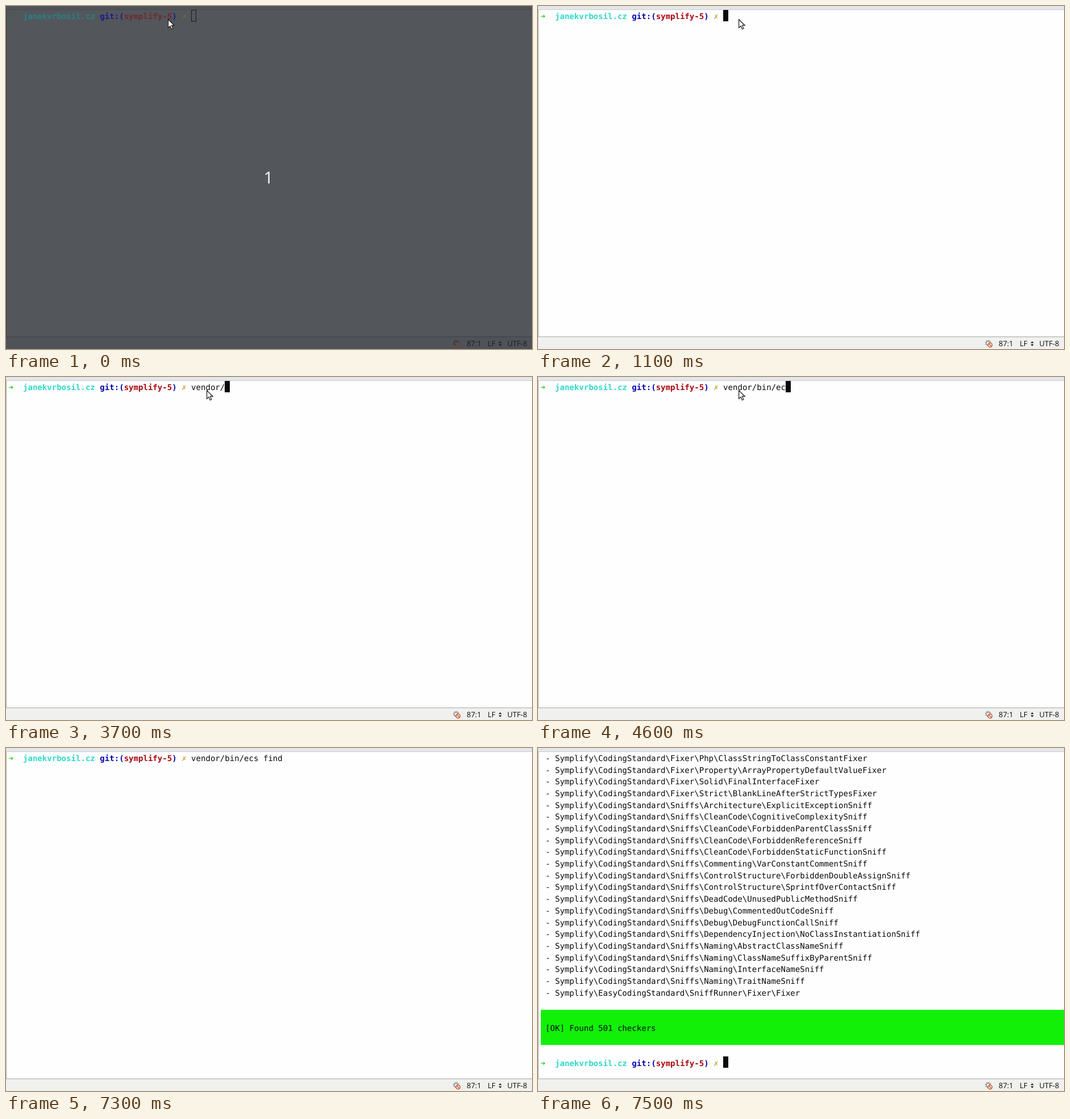
Recreate the animation shown at these times as an HTML page. Size 926 by 605 pixels, loop 8 s.

```html
<!DOCTYPE html>
<html lang="en">
<head>
<meta charset="utf-8">
<title>Terminal</title>
<style>
  :root {
    --bg: #fefefe; --strip: #f0f0ef; --bar: #f0f0ef; --edge: #a6a6a6; --top: #cbcbcb;
    --ink: #0a0a0a; --arrow: #2ad01c; --dir: #2fd9c8; --git: #0808a8; --branch: #a80810; --cross: #cf9f33;
    --gear: #8f8f8f; --stop: #d2592f;
  }
  .active { --strip: #e3e7ea; }
  .dim {
    --bg: #53565b; --strip: #505358; --bar: #4f5256; --edge: #3c3f43; --top: #484b4f;
    --ink: #191b1e; --arrow: #2c6f3c; --dir: #288188; --git: #1b1d86; --branch: #6f2a2c; --cross: #75633c;
    --gear: #36393c; --stop: #6a4a3c;
  }
  html, body { margin: 0; width: 100%; height: 100%; overflow: hidden; }
  svg { display: block; width: 926px; height: 605px; background: var(--bg); }
  text { white-space: pre; text-rendering: geometricPrecision; fill: var(--ink); }
  .term text { font: 14.05px "DejaVu Sans Mono", "DejaVu Sans", monospace; }
  .term .b { font-weight: bold; }
  .status text { font: 13px "Open Sans", sans-serif; }
  #count { font: 29px "Open Sans", sans-serif; fill: #fff; text-anchor: middle; }
</style>
</head>
<body>
<svg id="stage" viewBox="0 0 926 605">
  <rect width="926" height="6" fill="var(--strip)"/>
  <rect y="6" width="926" height="1" fill="var(--top)"/>
  <rect y="6" width="1" height="577" fill="var(--edge)"/>

  <g class="term">
    <g id="list"></g>
    <g id="footer">
      <rect x="5" y="461.8" width="921" height="62" fill="#12f008"/>
    </g>
    <g id="prompt"></g>
    <text id="typed"></text>
    <rect id="caret" stroke="var(--ink)"/>
  </g>

  <g class="status">
    <rect y="583" width="926" height="22" fill="var(--bar)"/>
    <rect y="583" width="926" height="1" fill="var(--edge)"/>
    <g fill="none">
      <circle cx="792.4" cy="594.4" r="3.2" stroke="var(--gear)" stroke-width="1.4"/>
      <circle cx="792.4" cy="594.4" r="4.7" stroke="var(--gear)" stroke-width="1.5" stroke-dasharray="1.8 1.89"/>
      <circle cx="795.9" cy="598.1" r="3.6" fill="var(--bar)" stroke="var(--stop)" stroke-width="1.5"/>
      <path d="M793.4 595.6l5 5" stroke="var(--stop)" stroke-width="1.4"/>
    </g>
    <text x="811" y="600">87:1</text>
    <text x="848" y="600">LF</text>
    <path d="M867.3 594.6l2.7-3 2.7 3zM867.3 596.8l2.7 3 2.7-3z" fill="var(--ink)"/>
    <text x="882.5" y="600">UTF-8</text>
  </g>

  <text id="count" x="462" y="313">1</text>
  <path id="mouse" d="M.6.8V15.4L4 12.2 6.4 17.8 8.9 16.7 6.5 11.2H11.2Z" fill="#fff" stroke="#1a1a1a" stroke-width="1.2"/>
</svg>

<script>
const LOOP = 8000, COL = 8.46, ROW = 20.68, LEFT = 4.6, TOP = 6.7;
const OFF = 0, SOLID = 1, HOLLOW = 2;
const $ = id => document.getElementById(id);
const colX = c => LEFT + c * COL;
const baseline = r => TOP + 16.3 + r * ROW;

function addText(parent, str, col, row, fill) {
  const el = document.createElementNS("http://www.w3.org/2000/svg", "text");
  el.textContent = str;
  el.setAttribute("x", colX(col));
  el.setAttribute("y", baseline(row));
  if (fill) {
    el.setAttribute("class", "b");
    el.style.fill = `var(--${fill})`;
  }
  parent.append(el);
}

const groups = [
  ["Fixer\\Php", "ClassStringToClassConstantFixer"],
  ["Fixer\\Property", "ArrayPropertyDefaultValueFixer"],
  ["Fixer\\Solid", "FinalInterfaceFixer"],
  ["Fixer\\Strict", "BlankLineAfterStrictTypesFixer"],
  ["Sniffs\\Architecture", "ExplicitExceptionSniff"],
  ["Sniffs\\CleanCode", "CognitiveComplexitySniff", "ForbiddenParentClassSniff",
    "ForbiddenReferenceSniff", "ForbiddenStaticFunctionSniff"],
  ["Sniffs\\Commenting", "VarConstantCommentSniff"],
  ["Sniffs\\ControlStructure", "ForbiddenDoubleAssignSniff", "SprintfOverContactSniff"],
  ["Sniffs\\DeadCode", "UnusedPublicMethodSniff"],
  ["Sniffs\\Debug", "CommentedOutCodeSniff", "DebugFunctionCallSniff"],
  ["Sniffs\\DependencyInjection", "NoClassInstantiationSniff"],
  ["Sniffs\\Naming", "AbstractClassNameSniff", "ClassNameSuffixByParentSniff",
    "InterfaceNameSniff", "TraitNameSniff"],
];
const checkers = groups.flatMap(([ns, ...names]) =>
  names.map(name => `Symplify\\CodingStandard\\${ns}\\${name}`));
checkers.push("Symplify\\EasyCodingStandard\\SniffRunner\\Fixer\\Fixer");
checkers.forEach((name, row) => addText($("list"), "- " + name, 1, row));
addText($("footer"), "[OK] Found 501 checkers", 1, 23);

[["➜", 0, "arrow"], ["janekvrbosil.cz", 3, "dir"], ["git:(", 19, "git"],
 ["symplify-5", 24, "branch"], [")", 34, "git"], ["✗", 36, "cross"]]
  .forEach(([str, col, fill]) => addText($("prompt"), str, col, 0, fill));
$("typed").setAttribute("x", colX(38));
$("typed").setAttribute("y", baseline(0));

// time, typed length, caret
const keys = [
  [0, 0, HOLLOW], [1100, 0, SOLID], [2100, 0, OFF], [2800, 0, SOLID],
  [3100, 1, SOLID], [3200, 2, SOLID], [3300, 3, SOLID], [3400, 5, SOLID], [3500, 6, SOLID],
  [3700, 7, SOLID], [3900, 8, SOLID], [4000, 9, SOLID], [4200, 11, SOLID],
  [4400, 12, SOLID], [4600, 13, SOLID], [4900, 15, SOLID], [5400, 15, OFF], [5900, 15, SOLID],
  [6000, 14, SOLID], [6100, 16, SOLID], [6300, 18, SOLID], [6400, 19, SOLID],
  [7100, 19, OFF], [7500, 0, SOLID],
];
// time, x, y
const moves = [[0, 285, 23], [100, 333.5, 32], [400, 341, 30], [500, 348, 26], [600, 353, 23]];

const at = (track, t) => track.findLast(k => k[0] <= t);
const show = (id, on) => { $(id).style.display = on ? "" : "none"; };

function placeCaret(mode, col, row) {
  const inset = mode === HOLLOW ? 0.5 : 0;
  const box = {
    x: Math.round(colX(col)) + inset, y: Math.round(TOP + row * ROW) + inset,
    width: 9 - 2 * inset, height: 20 - inset,
    fill: mode === HOLLOW ? "none" : "var(--ink)", "stroke-width": mode === HOLLOW ? 1 : 0,
  };
  for (const k in box) $("caret").setAttribute(k, box[k]);
  show("caret", mode !== OFF);
}

function draw(t) {
  const [, len, caret] = at(keys, t);
  const [, mx, my] = at(moves, t);
  const listing = t >= 7400, done = t >= 7500, entered = t >= 6600 && !done;

  $("stage").setAttribute("class", t < 100 ? "dim" : t < 1100 ? "" : "active");
  show("count", t < 100);
  show("list", listing);
  show("footer", done);
  show("prompt", !listing || done);
  show("typed", !listing);
  $("prompt").setAttribute("transform", `translate(0 ${done ? 26 * ROW : 0})`);
  $("typed").textContent = (t < 6000 ? "vendor/bin/ecs/" : "vendor/bin/ecs find").slice(0, len);
  placeCaret(caret, entered ? 0 : 38 + len, done ? 26 : entered ? 1 : 0);
  $("mouse").setAttribute("transform", `translate(${mx} ${my})`);
  show("mouse", t < 7200);
}

const start = performance.now();
function tick() {
  draw((performance.now() - start) % LOOP);
  requestAnimationFrame(tick);
}
tick();
</script>
</body>
</html>
```
